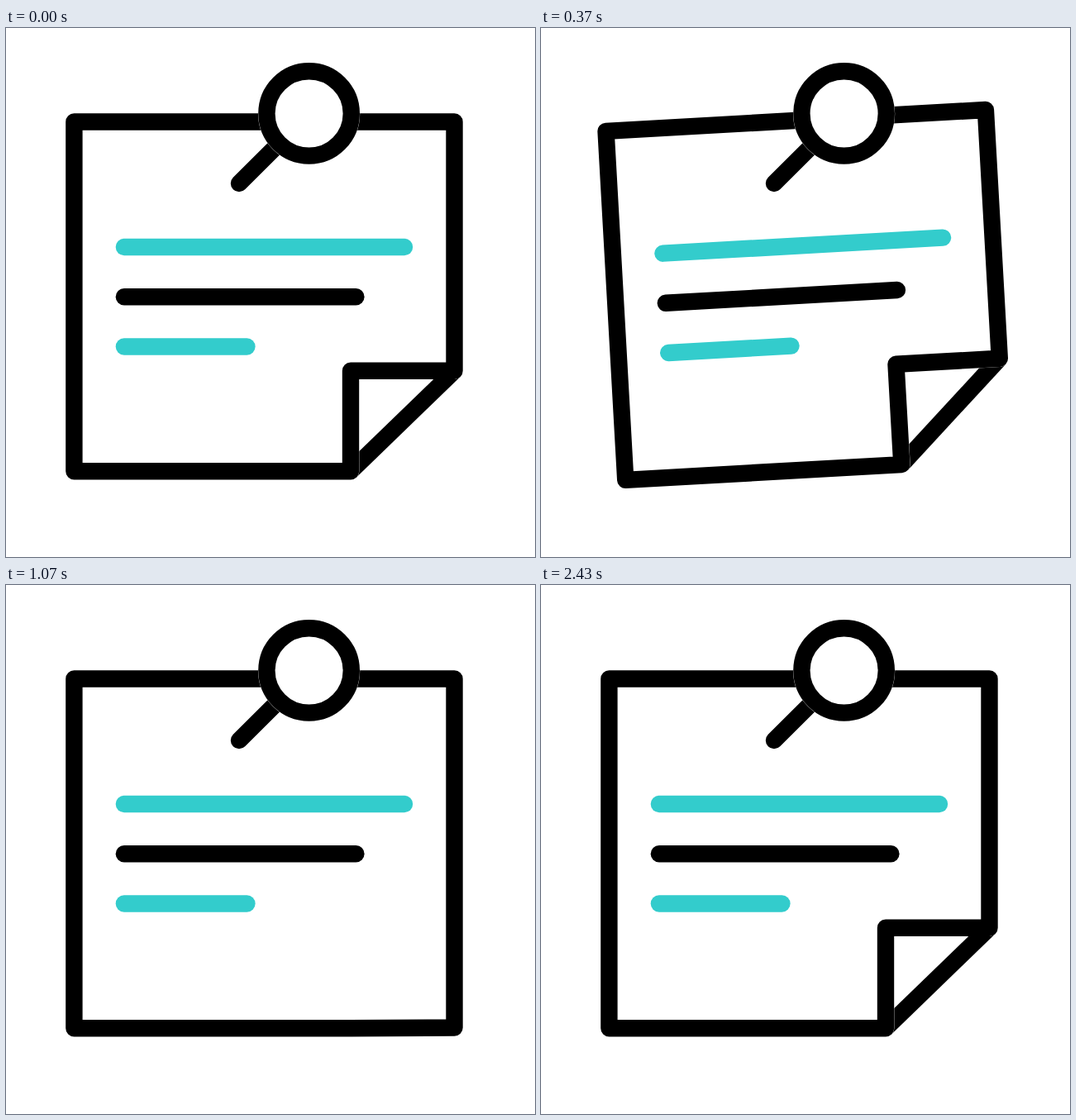
Animation of 640x640 px, one loop 2.5 s. Source, as an HTML page:

```html
<!DOCTYPE html>
<html lang="en">
<head>
<meta charset="utf-8">
<title>Pinned note</title>
<style>
  html, body { margin: 0; width: 100%; height: 100%; overflow: hidden; background: #fff; }
  svg { display: block; width: 100%; height: 100%; }
  svg * { stroke-width: 20.4; stroke-linecap: round; stroke-linejoin: round; }
  .ink { stroke: #000; }
  .teal { stroke: #3cc; }
  svg .gap { stroke: #fff; stroke-width: 20.8; }
  #crease { stroke-linecap: butt; }
</style>
</head>
<body>
<svg viewBox="0 0 640 640" fill="none">
  <g id="note">
    <path id="crease" class="ink" d="M542.5 414.7L417 536.2"/>
    <path class="sheet gap" fill="#fff"/>
    <path class="sheet ink" fill="#fff"/>
    <g id="lines"></g>
  </g>
  <path class="ink" d="M330 140.2L282 188"/>
  <circle class="gap" cx="366.6" cy="103.4" r="51.2"/>
  <circle class="ink" cx="366.6" cy="103.4" r="51.2" fill="#fff"/>
</svg>
<script>
const LOOP = 2500, STEP = 100 / 3;
const TIP = "282 188";

// Keys: [time in steps, value, ...]
const swing = [[1, 0], [5.3, 4.2], [10.6, -3.3], [14.8, 0]];
const corner = [
  [10.8, 417, 414.7],
  [18.4, 405.7, 397.3],
  [32, 542.5, 535.5],
  [60.5, 542.5, 535.5],
  [73, 417, 414.7]
];

// wipe: old stroke leaves to the right; draw: new stroke enters from the left
const lines = [
  { y: 265, end: 482, tone: "teal", wipe: [16, 27.4], draw: [20, 31.1] },
  { y: 325.2, end: 423.4, tone: "ink", wipe: [16, 24.9], draw: [20, 27.4] },
  { y: 385.5, end: 291.4, tone: "teal", wipe: [16, 27.4], draw: [20, 28.9] }
];
const LEFT = 142.9;

const note = document.getElementById("note");
const sheets = document.querySelectorAll(".sheet");

for (const line of lines) {
  line.path = document.createElementNS("http://www.w3.org/2000/svg", "path");
  line.path.setAttribute("class", line.tone);
  document.getElementById("lines").append(line.path);
}

const ease = u => u * u * (3 - 2 * u);
const progress = (n, [a, b]) => ease(Math.min(1, Math.max(0, (n - a) / (b - a))));

function sample(keys, n) {
  let i = 0;
  while (i < keys.length - 2 && n > keys[i + 1][0]) i++;
  const [t0, ...from] = keys[i], [t1, ...to] = keys[i + 1];
  const p = progress(n, [t0, t1]);
  return from.map((v, k) => v + (to[k] - v) * p);
}

function lineShape(line, n) {
  const at = p => LEFT + (line.end - LEFT) * p;
  const gone = progress(n, line.wipe), drawn = progress(n, line.draw);
  let d = "";
  if (gone < 1) d += `M${at(gone)} ${line.y}H${line.end}`;
  if (drawn > 0) d += `M${LEFT} ${line.y}H${at(drawn)}`;
  return d;
}

function render(ms) {
  const n = Math.floor((Math.floor(ms / 10) * 10 + 3.4) / STEP);
  const [angle] = sample(swing, n);
  const [x, y] = sample(corner, n);
  note.setAttribute("transform", `rotate(${angle} ${TIP})`);
  const d = `M82.4 113.5H542.5V414.7L${x} ${y}L417 536.2H82.4Z`;
  sheets.forEach(s => s.setAttribute("d", d));
  lines.forEach(l => l.path.setAttribute("d", lineShape(l, n)));
}

const start = performance.now();
function tick() {
  render((performance.now() - start) % LOOP);
  requestAnimationFrame(tick);
}
tick();
</script>
</body>
</html>
```
